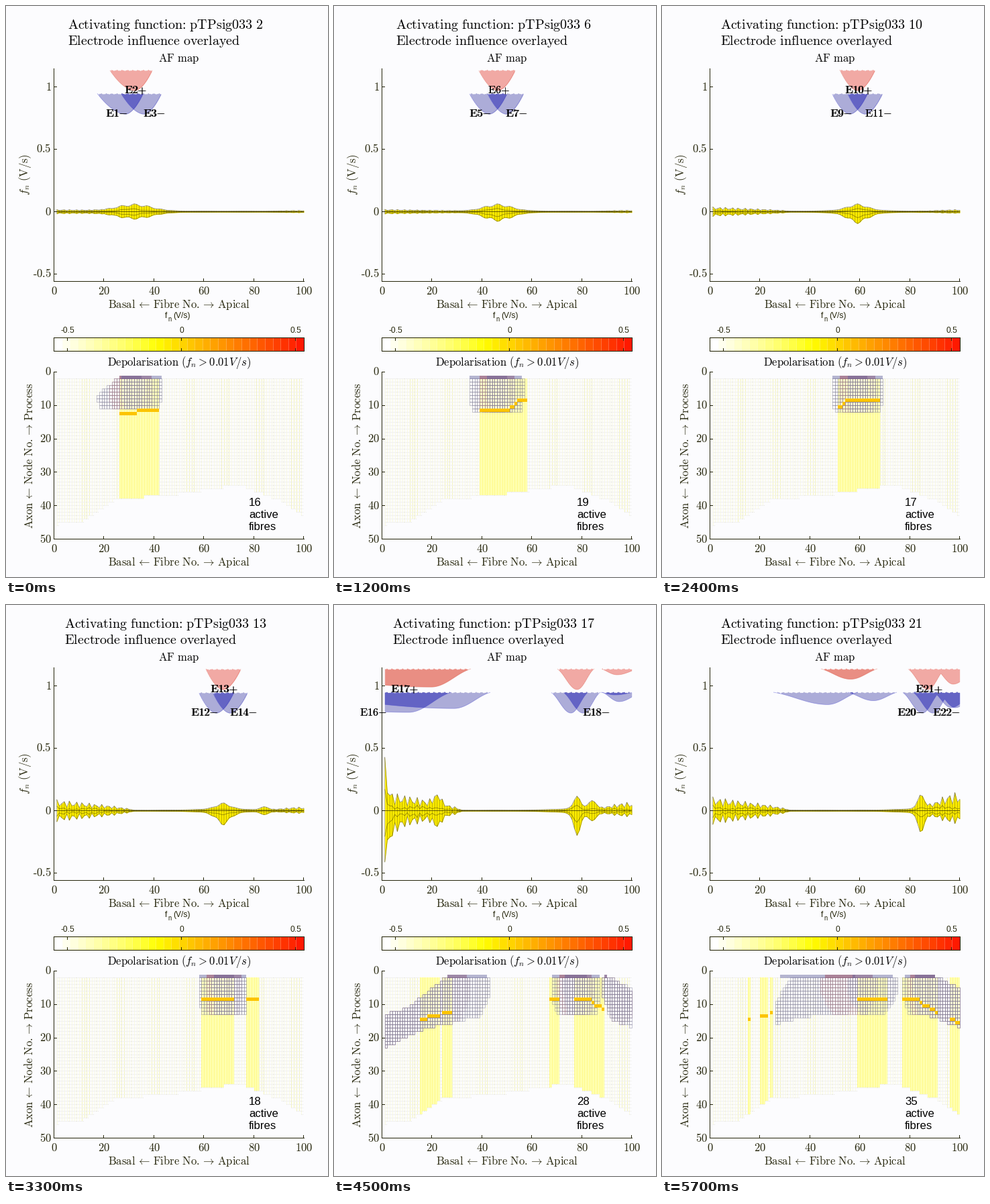
Recreate the animation shown at these times as a matplotlib script. Size 480 px wide and 851 px high, loop 6 s.

```python
import numpy as np
import matplotlib
import matplotlib.pyplot as plt
from matplotlib.animation import FuncAnimation
from matplotlib.collections import LineCollection, PolyCollection
from matplotlib.colors import to_rgba

matplotlib.rcParams["mathtext.fontset"] = "cm"
matplotlib.rcParams["font.family"] = "Liberation Sans"

W, H, DPI = 480, 851, 64
PT = 72 / DPI
INK = "#26260c"

fig = plt.figure(figsize=(W / DPI, H / DPI), dpi=DPI, facecolor="#fcfcfe")
ax = fig.add_axes([0, 0, 1, 1])
ax.set(xlim=(0, W), ylim=(H, 0))
ax.axis("off")


# ---------- drawing helpers (all coordinates in pixels) ----------
def fx(fibre):
    return np.round(72 + 3.72 * np.asarray(fibre))


def ny(node):
    return np.round(545 + 4.98 * np.asarray(node))


def tex(s):
    arrows = {"<": r"\leftarrow", ">": r"\rightarrow"}
    out = r"\ ".join(arrows.get(w, r"\text{%s}" % w) for w in s.split())
    for a in arrows.values():
        out = out.replace(r"\ %s\ " % a, r"\,%s\," % a)
    return "$" + out + "$"


def text(x, y, s, size=16.67, ha="center", va="baseline", color=INK, **kw):
    return ax.text(x, y, s, fontsize=size * PT, ha=ha, va=va, color=color, **kw)


def lines(segs, color, width=1.0, alpha=1.0, z=2, aa=False):
    return ax.add_collection(LineCollection(
        segs, colors=color, linewidths=width * PT, alpha=alpha, zorder=z,
        antialiaseds=aa, capstyle="butt", snap=False), autolim=False)


def boxes(rects, face, edge="none", z=2):
    verts = [[(a, b), (c, b), (c, d), (a, d)] for a, b, c, d in rects]
    return ax.add_collection(PolyCollection(
        verts, facecolors=[face], edgecolors=[edge], linewidths=PT,
        antialiaseds=False, zorder=z, snap=False), autolim=False)


def area(x, low, high, color, alpha=1.0):
    return ax.fill_between(x, low, high, where=np.abs(high - low) > .8,
                           color=color, alpha=alpha, linewidth=0, zorder=3)


def peak(v, mid, width):
    return np.exp(-((v - mid) / width) ** 2)


# ---------- static parts ----------
def plot_frame(top, bottom, ticks, label_y, name_y):
    segs = [[(71.5, top), (71.5, bottom + 1)], [(71, bottom + .5), (445, bottom + .5)]]
    for y, s in ticks:
        segs.append([(72, y + .5), (76, y + .5)])
        text(67.5, y + 5.5, tex(s), ha="right")
    for v in range(0, 101, 20):
        x = fx(v) - .5
        segs.append([(x, bottom - 4), (x, bottom)])
        text(fx(v), label_y, tex(str(v)))
    lines(segs, INK, z=8)
    text(258, name_y, tex("Basal < Fibre No. > Apical"))


plot_frame(93, 410, [(round(306 - 185.6 * v), "%g" % v) for v in (1, .5, 0, -.5)], 430, 450)
plot_frame(545, 794, [(ny(v), str(v)) for v in range(0, 51, 10)], 813.5, 834)
text(28, 251, r"$f_n\ \text{(V/s)}$", va="center", rotation=90)
text(35, 670, tex("Axon < Node No. > Process"), va="center", rotation=90)
text(258, 83, tex("AF map"), color="black")
text(258, 536, r"$\text{Depolarisation}\ (f_n>0.01V/s)$", color="black")

# colour bar
text(237, 465, "f", 12, ha="left")
text(241, 470, "n", 9.5, ha="left")
text(249.5, 465, "(V/s)", 12, ha="left")
bands = 32
edges = np.round(np.linspace(72, 444, bands + 1))
for k in range(bands):
    t = k / (bands - 1)
    shade = (1, min(1, 1 - .9 * (t - .4) / .6), max(0, 1 - t / .4) ** .8)
    boxes([(edges[k], 494, edges[k + 1], 514)], shade, z=1)
marks = [[(71.5, 494.5), (444.5, 494.5), (444.5, 514.5), (71.5, 514.5), (71.5, 494)]]
for v in (-.5, 0, .5):
    x = round(261 + 340 * v) + .5
    text(x, 487, "%g" % v if v >= 0 else "-%g" % -v, 12)
    marks += [[(x, 495), (x, 499)], [(x, 510), (x, 514)]]
lines(marks, "#202000", z=3)


def floor_node(f):
    return np.round(np.interp(f, [1, 10, 25, 45, 72, 77, 90, 100],
                              [45.5, 45, 38, 37, 34, 34.6, 38.5, 43]))


def column(f):
    return [(fx(f) + .5, 555), (fx(f) + .5, ny(floor_node(f)))]


fibres = range(1, 100)
lines([column(f) for f in fibres],
      ["#f5f5bc" if f % 14 in (0, 11, 12, 13) else "#fafae0" for f in fibres], z=1)
dots = [[(fx(f) + a, ny(n) + .5), (fx(f) + a + 1, ny(n) + .5)]
        for f in fibres for n in range(2, int(floor_node(f)) + 1) for a in (0, 2)]
lines(dots, "#e6e6e0", z=1)


# ---------- electrodes ----------
def centre(i):
    return 178 + 12.75 * (i - 1) - .153 * (i - 1) * (i - 9)


def dip(x, c, left, right):
    return np.clip(np.where(x < c, (c - x) / left, (x - c) / right), 0, 1)


def bump(u):
    return .5 + .5 * np.cos(np.pi * u)


def depth(i, x):
    if i < 15:
        return 32 * (1 - dip(x, centre(i), 26 + 17 * np.exp((1 - i) / 3), 27) ** 1.8)
    d = 32 * bump(dip(x, centre(i), 34, 29))
    if i > 15:
        # the neighbouring turn, sliding towards the apex
        reach = 45 + 300 / (1 + np.exp(2 * (i - 19.2)))
        far = dip(x, 145 + 34 * (i - 17), reach, 68 - 5 * (i - 17))
        d = np.maximum(d, (31 - 2.9 * (i - 16)) * bump(far))
        edge = dip(x, 422 + 3 * (i - 17), 30, 40)
        d = np.maximum(d, min(24, 5 * (i - 15)) * bump(edge))
    return d


xs = np.arange(76, 444.5, 1.0)
teeth = 1.6 * np.abs(np.sin(xs * .4)) + .9 * np.abs(np.sin(xs * .95))


def sheet(base, d, color, alpha):
    return area(xs, base + np.minimum(teeth, d), base + d, color, alpha)


def ribs(base, d, color):
    segs = [[(x, base + min(2, v)), (x, base + v)] for x, v in zip(xs[::2], d[::2]) if v > 1]
    outline = np.column_stack([xs, np.where(d > 1, base + d, np.nan)])
    return [lines(segs, color, .8, .22, z=3, aa=True),
            lines([outline], color, .8, .4, z=3, aa=True)]


def influence_map(e):
    a, b, c = depth(e - 1, xs), depth(e + 1, xs), depth(e, xs)
    out = [sheet(129, d, "#5858a8", .42) for d in (a, b)]
    out.append(sheet(129, np.minimum(a, b), "#3030c0", .35))
    out.append(sheet(94, c, "#ee6a60", .5))
    out.append(sheet(94, np.where(xs < 320, c, 0) * (e > 15), "#d85038", .3))
    for d in (a, b):
        out += ribs(129, d, "#3c3cd0")
    out += ribs(94, c, "#dc5040")
    spots = ((e - 1, 3, "right", "\u2212", 165), (e, 1.5, "center", "+", 130),
             (e + 1, -.5, "left", "\u2212", 165))
    for i, dx, ha, sign, y in spots:
        wrapped = i in (16, 17)
        x = dx + (76 + 28 * (i - 16) if wrapped else centre(i))
        for shift in (-.4, .4):
            out.append(text(x + shift, y, r"$\text{E%d%s}$" % (i, sign), 16.4,
                            ha=ha, color="black", zorder=9))
    return out


# ---------- activating function ----------
def envelope(e, x, up):
    ripple = .64 + .36 * np.cos(2 * np.pi * (x - 76) / 9.5)
    basal = 2.5 + 27 * peak(e, 17.5, 5.5)
    y = .8 + basal * np.clip(1 - (x - 72) / 118, 0, 1) ** .7 * ripple
    y += 46 * peak(e, 17, 1.4) * np.exp(-(x - 76) / (3 if up else 9))
    y += 13 * peak(e, 17, 2) * peak(x, 154, 8)
    c = min(centre(e), 386)
    h = 9 + 27 * peak(e, 19, 2) if up else 7 + .8 * e + 14 * peak(e, 17.5, 3)
    y += h * peak(x, c, max(8, 36 - 1.6 * e)) * (.8 + .2 * np.cos((x - c) * np.pi / 10))
    y += 2 * peak(x, c, 48)
    y += 13 * peak(e, 16.5, 3.5) * peak(x, 385, 8)
    tail = (1 + 25 * (e / 21) ** 4) * np.clip((x - 388) / 42, 0, 1) * ripple
    return y + tail * (1 if up else .7)


def activation(e):
    x = 72 + 3.72 * np.arange(1, 101)
    up, lo = envelope(e, x, True), envelope(e, x, False)
    mid = 306.5
    wave = .3 + .12 * np.sin(x / 9)
    curves = [mid - up, mid + lo, mid - up * wave, mid + lo * (wave + .1)]
    ties = [[(a, mid - u), (a, mid + v)] for a, u, v in zip(x, up, lo)]
    return [area(x, mid - up, mid + lo, "#fcec00"),
            lines(ties, "#504800", .7, .5, z=4, aa=True),
            lines([np.column_stack([x, c]) for c in curves], "#403800", .7, .6, z=4, aa=True),
            lines([[(72, mid), (444, mid)]], "#302c00", 1, .7, z=4)]


# ---------- depolarisation ----------
BASAL = [15, 20, 21, 22, 24, 16, 17, 18, 26, 27, 19, 25]  # last to leave comes first


def active(e):
    if e < 13:
        start = np.interp(e, [2, 4, 8, 13], [26, 33, 45, 59])
        end = np.interp(e, [2, 4, 8, 13], [42, 51, 66, 72])
        return list(range(round(start), round(end)))
    on = list(range(round(67 - (e - 17) ** 2 / 2), 72 if e < 15 else 71))
    on += range(77, 82 + round(9.5 * (1 - np.exp((13 - e) / 3))))
    on += range(96, 96 + max(0, round(1.5 * (e - 18.3))))
    rate = .8 if e < 17 else .45
    return on + BASAL[:max(0, round(12.2 - rate * (e - 17) ** 2))]


def onset(f):
    return np.round(np.interp(f, [15, 25, 40, 50, 54, 82, 88, 99],
                              [14, 12, 11, 11, 8, 8, 11, 15]))


def reach(i, e):
    cells, strip = [], []
    cap = 10.7 + .17 * e if e < 15 else 30
    for f in fibres:
        x = 72 + 3.72 * (f + .5)
        d = float(depth(i, x))
        if d < 1.2:
            continue
        hi = np.interp(f, [0, 10, 26, 88, 100], [13, 11, 1, 1, 5.5])
        lo = min(cap, np.interp(f, [0, 15, 42, 86, 100], [23, 17.5, 13, 13, 17]))
        size = min(1, d / 9) ** .5
        anchor = 1 if x < 215 and e > 17 else .2
        top = hi + anchor * (lo - hi) * (1 - size)
        for n in range(max(2, round(top)), round(top + (lo - hi) * size)):
            cells.append((fx(f) + .5, ny(n) + .5, fx(f + 1) + .5, ny(n + 1) + .5))
        if hi < 1.6 and d > 3:
            strip.append((fx(f), 551, fx(f + 1), 556))
    return cells, strip


def depolarisation(e):
    on = active(e)
    out = [boxes([(fx(f), 555, fx(f + 1), ny(floor_node(f))) for f in on], "#ffffae", z=1.5),
           lines([column(f) for f in on], "#fff884", 1, .8, z=1.6)]
    for i in (e - 1, e, e + 1):
        cells, strip = reach(i, e)
        edge, fill = ("#7c4458", "#a04858") if i == e else ("#4c4870", "#60609a")
        out.append(boxes(cells, (1, 1, 1, .2), to_rgba(edge, .3), z=3))
        out.append(boxes(strip, to_rgba(fill, .45), z=4))
    out.append(boxes([(fx(f), ny(onset(f)), fx(f + 1), ny(onset(f) + 1)) for f in on],
                     "#fcc400", z=5))
    for k, s in enumerate((str(len(on)), "active", "fibres")):
        out.append(text(362, 745 + 17.8 * k, s, 16.7, ha="left", color="black", zorder=9))
    return out


# ---------- animation ----------
live = []


def clear():
    for a in live:
        a.remove()
    live.clear()
    return []


def draw(k):
    clear()
    e = k + 2
    left = 92 if e < 10 else 87
    for y, s in ((34, "Activating function: pTPsig033 %d" % e), (58, "Electrode influence overlayed")):
        live.append(text(left, y, tex(s), 20.1, ha="left", color="black"))
    live.extend(influence_map(e) + activation(e) + depolarisation(e))
    return live


anim = FuncAnimation(fig, draw, frames=20, interval=300, init_func=clear,
                     repeat=True, repeat_delay=0, blit=False)
plt.show()
```
